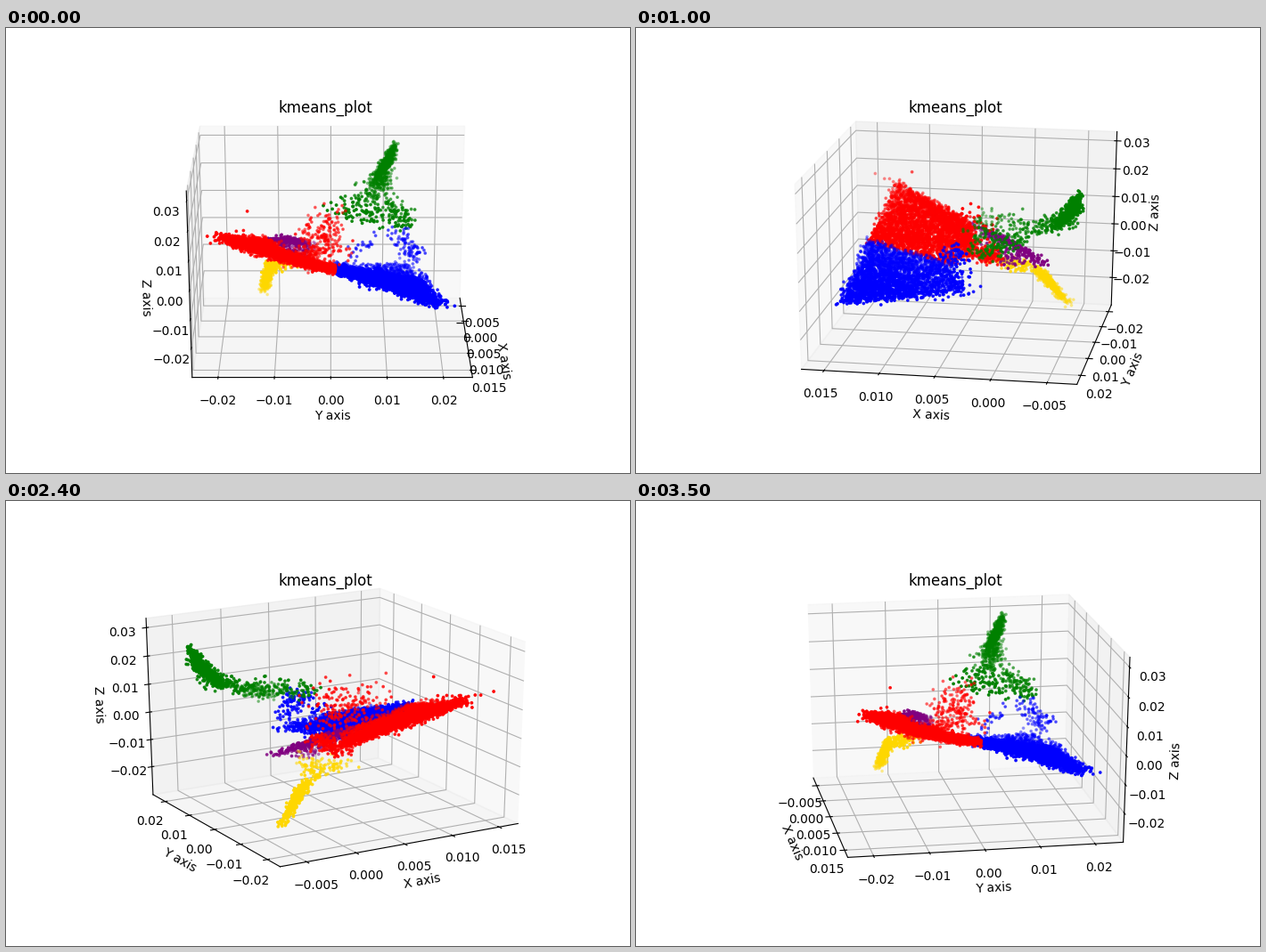
Recreate the animation shown at these times as a matplotlib script. Size 700 by 500 pixels, loop 3600 ms.

```python
import numpy as np
import matplotlib.pyplot as plt
from matplotlib.animation import FuncAnimation
from mpl_toolkits.mplot3d import Axes3D

FRAMES, INTERVAL = 36, 100
CENTER = np.array([0.00471, 0.00028, 0.00144])
SPAN = np.array([0.0237, 0.04777, 0.0611])
rng = np.random.default_rng(7)


class WideAxes(Axes3D):
    """3D axes that fill their whole rectangle instead of a square."""

    def apply_aspect(self, position=None):
        pass


def tri(n, a, b, c, sd=0.012, weights=(1, 1, 1)):
    """Random points in a triangle, with a little thickness."""
    mix = rng.dirichlet(weights, n)
    return mix @ np.array([a, b, c]) + rng.normal(0, sd, (n, 3))


def blob(n, mid, sd):
    return rng.normal(mid, sd, (n, 3))


# Corners of the cloud, in units of the axis spans around the centre
red_tip, blue_tip = (0.33, -0.42, 0.19), (0.385, 0.395, -0.172)
edge, red_in, blue_in = (0.36, 0.0, 0.02), (-0.03, -0.15, -0.08), (0.05, 0.02, -0.09)
blue_side, blue_low = (0.12, 0.35, -0.145), (-0.07, 0.30, -0.13)
arc_top, arc_end = (0.03, -0.248, 0.06), (-0.32, -0.078, -0.104)
green_tip, green_edge, green_end = (-0.476, 0.249, 0.444), (-0.473, 0.229, 0.33), (-0.387, 0.16, 0.23)
gold_tip, gold_end = (-0.385, -0.28, -0.44), (-0.24, -0.25, -0.196)

sheet = np.vstack([
    tri(1900, red_tip, edge, red_in),
    tri(1000, red_tip, red_in, arc_top),
    tri(1500, edge, blue_tip, blue_side),
    tri(900, edge, blue_side, blue_in),
    tri(250, edge, red_in, blue_in),
])
is_blue = sheet[:, 1] > 0.012

halo = blob(190, (0.04, -0.03, 0.08), (0.08, 0.05, 0.075))
halo = halo[(halo[:, 2] > -0.03) & (halo[:, 1] < 0.08)]

red = np.vstack([
    sheet[~is_blue],
    halo,
    tri(170, red_in, (-0.08, -0.2, -0.1), (-0.12, 0.0, -0.06), 0.02),
    tri(25, red_tip, (0.37, -0.43, 0.2), (0.28, -0.33, 0.2), 0.015),
    [(0.255, -0.314, 0.31), (0.432, -0.455, 0.24), (0.39, -0.432, 0.22)],
])

blue = np.vstack([
    sheet[is_blue],
    tri(260, blue_in, blue_side, blue_low, 0.015),
    tri(85, (-0.04, 0.25, 0.09), blue_low, (0.08, 0.33, 0.0), 0.02),
    tri(30, (-0.04, 0.25, 0.09), (0.05, 0.1, 0.05), blue_in, 0.02),
    tri(40, blue_tip, blue_side, (0.41, 0.45, -0.17), 0.012),
])

green = np.vstack([
    tri(520, green_tip, green_edge, green_end, 0.009),
    tri(170, green_edge, green_end, (-0.33, 0.2, 0.2), 0.02),
    tri(150, green_end, (-0.05, 0.0, 0.2), (-0.08, 0.27, 0.08), 0.022),
    tri(90, green_end, (-0.08, 0.27, 0.08), (-0.2, 0.3, 0.12), 0.02),
])

gold = np.vstack([
    tri(380, gold_tip, gold_end, (-0.29, -0.25, -0.24), 0.009),
    tri(110, gold_end, (0.0, -0.25, -0.12), (-0.2, -0.06, -0.13), 0.016, (2, 1, 1)),
])

purple = np.vstack([
    tri(230, arc_top, arc_end, (-0.14, -0.17, 0.0), 0.008),
    tri(110, arc_top, arc_end, (-0.15, -0.1, -0.13), 0.014),
])

fig = plt.figure(figsize=(7, 5), dpi=100)
ax = fig.add_subplot(111, axes_class=WideAxes)
ax.set_box_aspect((1, 1, 1), zoom=np.sqrt(3) / 1.8294640721620434)

groups = {"red": red, "blue": blue, "green": green, "gold": gold, "purple": purple}
for color, pts in groups.items():
    ax.scatter(*(CENTER + SPAN * pts).T, s=3, c=color)

ax.set_title("kmeans_plot", y=0.966)
ax.set_xlabel("X axis")
ax.set_ylabel("Y axis")
ax.set_zlabel("Z axis")
ax.set_xticks(np.arange(-1, 4) * 0.005)
ax.set_yticks(np.arange(-2, 3) * 0.01)
ax.set_zticks(np.arange(-2, 4) * 0.01)

low, high = CENTER - SPAN * 25 / 48, CENTER + SPAN * 25 / 48
ax.set_xlim(low[0], high[0])
ax.set_ylim(low[1], high[1])
ax.set_zlim(low[2], high[2])


def update(i):
    # The tiny offset settles which side the axes take at right angles
    ax.view_init(elev=22, azim=i * 360 / FRAMES + 1e-4)
    return []


anim = FuncAnimation(fig, update, frames=FRAMES, interval=INTERVAL, repeat=True, repeat_delay=0)
plt.show()
```
